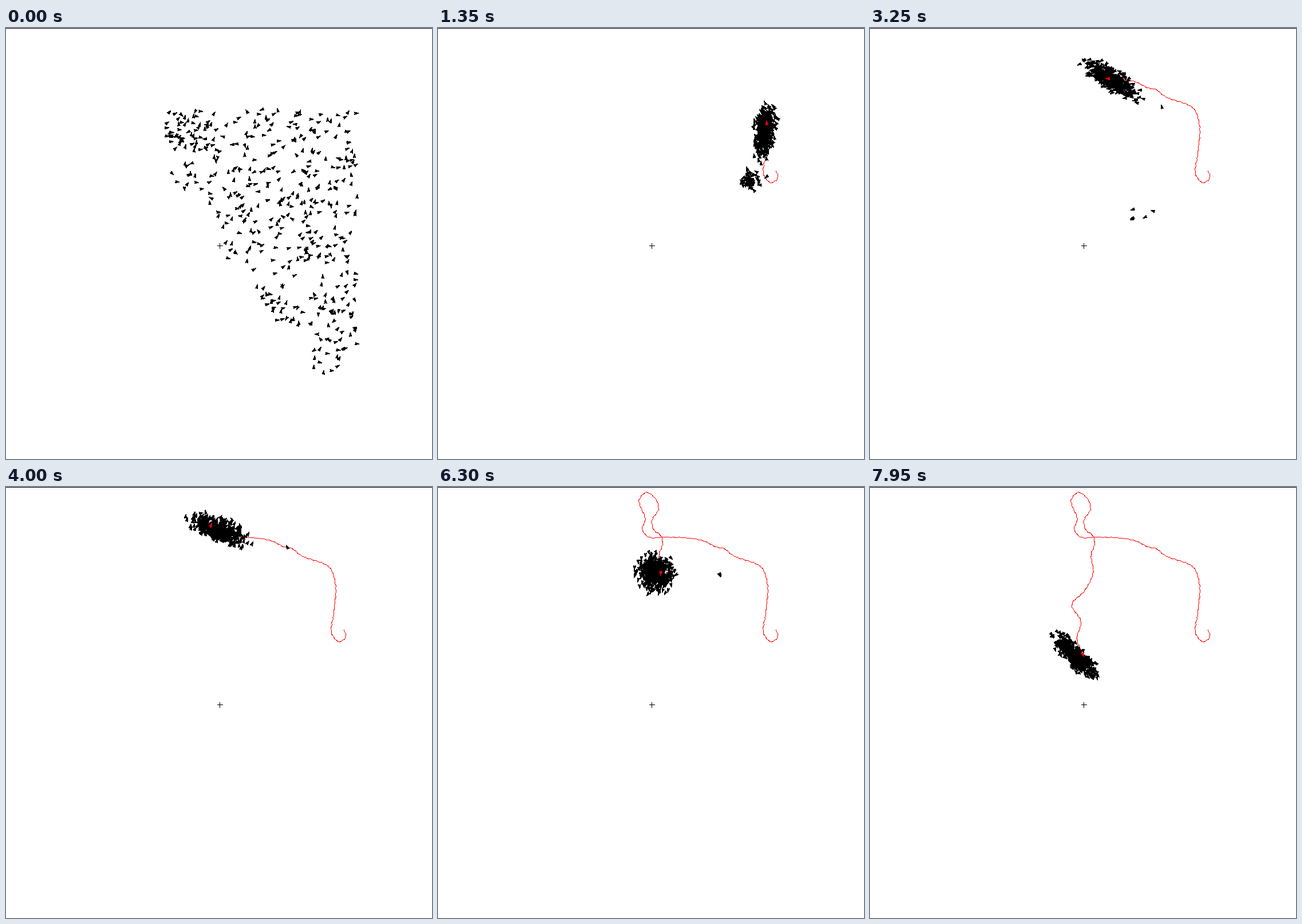
Recreate the animation shown at these times as a matplotlib script. Size 744 px wide and 753 px high, loop 8 s.

```python
import numpy as np
import matplotlib.pyplot as plt
from matplotlib.animation import FuncAnimation
from matplotlib.collections import PolyCollection
from matplotlib.patches import Rectangle

W, H, DPI = 744, 753, 100
FRAMES, STEP_MS = 160, 50
BIRDS = 440
rng = np.random.default_rng(12)

# Key points of the leader's path, joined by a smooth curve
PATH = np.array([
    (590, 250), (593, 262), (581, 271), (570, 260), (572, 220), (575, 171),
    (568, 146), (510, 117), (499, 108), (488, 106), (464, 95), (440, 90),
    (400, 88), (363, 85), (356, 74), (361, 60), (352, 20), (363, 10),
    (376, 17), (385, 38), (373, 60), (376, 75), (389, 86), (392, 97),
    (386, 118), (389, 150), (374, 182), (352, 206), (368, 236), (361, 266),
    (372, 293)], float)

# frame, offset from leader x/y, major and minor spread, angle
CLOUD = np.array([
    (17, 2, -10, 30, 18, 90), (27, -4, 15, 21, 8, 100),
    (51, -1, -3, 25, 7.5, 43), (80, 14, 8, 24, 9, 20),
    (104, 0, -16, 22, 14, 8), (126, -10, 1, 15, 14, 20),
    (159, -13, 3, 23, 7.5, 46)])

# size, spread, first and last frame apart from the flock, waypoints
STRAGGLERS = [
    (35, 8, 27, 51, [(543, 267), (523, 196)]),
    (14, 7, 27, 51, [(543, 266), (495, 264)]),
    (5, 9, 27, 66, [(542, 265), (505, 312), (460, 325)]),
    (1, 0, 27, 80, [(540, 246), (524, 163), (491, 105)]),
    (2, 2, 115, 138, [(486, 125), (493, 154), (530, 185)]),
]

# Aliased fills cover every pixel they touch, so the dart is drawn small.
DART = np.array([(3.7, 0), (-3.3, 2.1), (-2.6, 0), (-3.3, -2.1)])


def smooth(u):
    u = np.clip(u, 0, 1)
    return u * u * (3 - 2 * u)


def unit(v):
    return v / (np.hypot(v[..., 0], v[..., 1])[..., None] + 1e-6)


def normal(v):
    v = unit(v)
    return np.stack([-v[..., 1], v[..., 0]], -1)


def track(t, times, points):
    points = np.asarray(points)
    return np.stack([np.interp(t, times, points[:, i]) for i in (0, 1)], -1)


def lengths(points):
    return np.append(0, np.cumsum(np.hypot(*np.diff(points, axis=0).T)))


def hermite(points, n=24):
    """Smooth curve through points, with tangents scaled by chord length."""
    t = lengths(points)
    slope = np.gradient(points, t, axis=0)
    u = np.linspace(0, 1, n, endpoint=False)[:, None]
    h = smooth(u)
    parts = []
    for i, d in enumerate(np.diff(t)):
        parts.append(points[i] * (1 - h) + points[i + 1] * h
                     + d * u * (1 - u) * ((1 - u) * slope[i] - u * slope[i + 1]))
    return np.vstack(parts + [points[-1:]])


def start_field(n):
    """Random birds in a downward taper, a few bunched near its top left."""
    out = []
    while len(out) < n:
        if rng.random() < 0.05:
            x, y = rng.normal((320, 190), 25)
        else:
            x, y = rng.uniform((266, 142), (616, 617))
        left = np.interp(y, [142, 285, 300, 400, 617],
                         [272, 290, 352, 386, 556])
        right = np.interp(y, [555, 617], [614, 562])
        if y > 142 and left < x < right:
            out.append((x, y))
    return np.array(out)


# Leader, at constant speed
curve = hermite(PATH)
arc = lengths(curve)


def on_path(s):
    return track(s, arc, curve)


def travelled(k):
    return 6 + (arc[-1] - 6) * k / (FRAMES - 1)


def trail(s_end):
    s = np.arange(0, s_end, 0.8)
    sway = 0.5 * np.sin(s * 2 * np.pi / 10)[:, None]
    return on_path(s) + sway * normal(on_path(s + 2) - on_path(s - 2))


# Per-bird constants
start = start_field(BIRDS)
radius = np.sqrt(-2 * np.log(1 - 0.98 * rng.random(BIRDS)))
phase = rng.uniform(0, 2 * np.pi, BIRDS)
spin = rng.normal(0, 0.025, BIRDS)
swing = rng.normal(0, 16, BIRDS)
noise = rng.normal(0, 0.32, BIRDS)
first_angle = np.where(rng.random(BIRDS) < 0.25,
                       rng.uniform(-np.pi, np.pi, BIRDS),
                       rng.uniform(-1.7, 0.35, BIRDS))
local = rng.normal(0, 1, (BIRDS, 2))
distance = np.hypot(*(start - PATH[0]).T)
arrival = 8 + 9 * distance / distance.max()


def flock(k):
    dx, dy, major, minor, deg = (np.interp(k, CLOUD[:, 0], c)
                                 for c in CLOUD[:, 1:].T)
    a = np.radians(deg)
    u = major * radius * np.cos(phase + spin * k)
    v = minor * radius * np.sin(phase + spin * k)
    pos = on_path(travelled(k)) + (dx, dy)
    pos = pos + np.stack([u * np.cos(a) - v * np.sin(a),
                          u * np.sin(a) + v * np.cos(a)], -1)

    first = 0
    for size, spread, begin, end, points in STRAGGLERS:
        group = slice(first, first + size)
        first += size
        apart = smooth((k - begin + 10) / 10) * smooth((end + 15 - k) / 15)
        own = track(k, np.linspace(begin, end, len(points)), points)
        pos[group] += apart * (own + spread * local[group] - pos[group])

    # Opening rush from the scattered field, on slightly bent courses
    t = np.clip(k / arrival, 0, 1)[:, None]
    gap = start - pos
    bend = swing[:, None] * np.sin(np.pi * t)
    return pos + gap * (1 - smooth(t)) + bend * normal(gap)


def headings(k):
    d = flock(k + 1) - flock(max(k - 1, 0))
    aim = np.arctan2(d[:, 1], d[:, 0]) + noise
    turn = (aim - first_angle + np.pi) % (2 * np.pi) - np.pi
    return first_angle + min(k / 5, 1) * turn


def darts(pos, angle):
    c, s = np.cos(angle)[:, None], np.sin(angle)[:, None]
    x, y = DART.T
    return pos[:, None] + np.stack([c * x - s * y, s * x + c * y], -1)


fig = plt.figure(figsize=(W / DPI, H / DPI), dpi=DPI, facecolor="white")
ax = fig.add_axes([0, 0, 1, 1])
ax.set_xlim(0, W)
ax.set_ylim(H, 0)
ax.axis("off")

# Top border and the cross
for x, y, w, h in [(0, 0, W, 1), (369, 380, 10, 1), (373, 376, 1, 10)]:
    ax.add_patch(Rectangle((x, y), w, h, fc="black", lw=0, zorder=4))

line, = ax.plot([], [], ",", color="red", antialiased=False, zorder=1)


def dart_layer(color, z):
    layer = PolyCollection([], facecolors=color, linewidths=0,
                           antialiaseds=False, zorder=z)
    return ax.add_collection(layer, autolim=False)


birds = dart_layer("black", 2)
leader = dart_layer("red", 3)


def draw(k):
    s = travelled(k)
    d = on_path(s + 3) - on_path(s - 3)
    birds.set_verts(darts(flock(k), headings(k)))
    line.set_data(*trail(s).T)
    leader.set_verts(darts(on_path(s)[None], np.arctan2(d[1:], d[:1])))
    for art in (line, leader):
        art.set_visible(k > 0)
    return line, birds, leader


anim = FuncAnimation(fig, draw, frames=FRAMES, interval=STEP_MS,
                     repeat=True, repeat_delay=0, blit=False)
plt.show()
```
